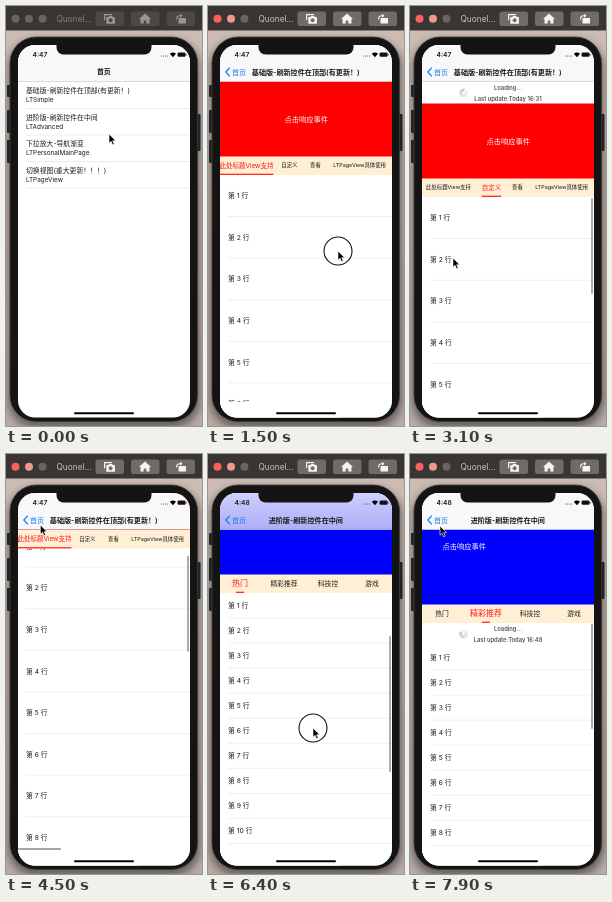
Write an HTML page that moves like this. It is 196 px wide and 420 px high and loops after 8 s.

```html
<!DOCTYPE html>
<html lang="zh">
<head>
<meta charset="utf-8">
<title>Scroll demo</title>
<style>
html, body { margin: 0; width: 100%; height: 100%; overflow: hidden; background: #b5a8a3; }
svg { display: block; width: 100%; height: 100%; }
text { font-family: Inter, "Noto Sans CJK SC", "Noto Sans CJK", sans-serif; white-space: pre; }
</style>
</head>
<body>
<svg id="stage" viewBox="0 0 196 420">
  <defs>
    <clipPath id="screenClip"><rect x="12" y="39" width="172" height="372.5" rx="17"/></clipPath>
    <linearGradient id="wall" x2="0" y2="1"><stop stop-color="#cdbdb4"/><stop offset="1" stop-color="#b9aca5"/></linearGradient>
    <linearGradient id="tint" x2="0" y2="1"><stop stop-color="#cfcfff"/><stop offset="1" stop-color="#aeaef6"/></linearGradient>
    <filter id="soft"><feGaussianBlur stdDeviation="4"/></filter>
  </defs>
</svg>
<script>
const LOOP = 8000, STEP = 100, TRAVEL = 370;
const LEFT = 12, WIDTH = 172, RIGHT = LEFT + WIDTH;
const TOP = 76, LIST_END = 395.8, HEADER = 74.5, BAR = 18.5, PULL = 22, OVERPULL = 40;
const BLUE = '#0f7bf5', RED = '#ff1a12';
const stage = document.getElementById('stage');

function el(parent, tag, attrs = {}, content) {
  const node = document.createElementNS('http://www.w3.org/2000/svg', tag);
  set(node, attrs);
  if (content !== undefined) node.textContent = content;
  return parent.appendChild(node);
}
function set(node, attrs) {
  for (const key in attrs) node.setAttribute(key, attrs[key]);
}
const show = (node, visible) => set(node, { display: visible ? 'inline' : 'none' });
const move = (node, x, y) => set(node, { transform: `translate(${x} ${y})` });
const group = parent => el(parent, 'g');
const rect = (parent, x, y, width, height, fill, rx = 0) =>
  el(parent, 'rect', { x, y, width, height, fill, rx });
const rule = (parent, x, y, stroke) =>
  el(parent, 'path', { d: `M${x} ${y}H${RIGHT}`, stroke, 'stroke-width': .5 });
// y is the visual middle of the line of text
const label = (parent, x, y, size, content, attrs = {}) =>
  el(parent, 'text', { x, y: y + size * .36, 'font-size': size, fill: '#1a1a1a', ...attrs }, content);

const clamp = v => Math.max(0, Math.min(1, v));
const mix = (a, b, p) => a + (b - a) * p;
const ramp = (t, start, length) => {
  const p = clamp((t - start) / length);
  return p * p * (3 - 2 * p);
};
const fade = (t, a, b) => clamp((t - a) / 100) * clamp((b - t) / 200);

// Pointer gestures: everything on screen follows from these
const drag = (start, length, x, y, dx, dy) => ({ start, length, x, y, dx, dy, end: start + length });
const tap = (start, x, y) => drag(start, 100, x, y, 0, 0);
const hide = (start, x, y) => drag(start, 230, x, y, 0, -HEADER);
const reveal = (start, x, y) => drag(start, 230, x, y, 0, HEADER);
const swipe = (start, x, y, dx) => drag(start, 250, x, y, dx, 0);
const pull = (start, x, y) => drag(start, 400, x, y, 0, OVERPULL);
const progress = (g, t) => ramp(t, g.start, g.length);

const simple = {
  open: tap(250, 75, 88), hide: hide(700, 98.5, 264), reveal: reveal(1200, 98.5, 190),
  next: swipe(1500, 130, 245, -70), pull: pull(2100, 85.5, 240), loaded: 3250,
  prev: swipe(3500, 43, 252, 90), hideAgain: hide(3950, 118, 240), close: tap(4600, 30, 66)
};
const advanced = {
  open: tap(5250, 75, 115), hide: hide(6300, 105, 304), reveal: reveal(6620, 105, 230),
  next: swipe(6880, 130, 280, -70), pull: pull(7130, 80, 255), loaded: LOOP, close: tap(7950, 30, 72)
};
const gestures = [simple, advanced].flatMap(tour => Object.values(tour).filter(g => g.start));

function pointerAt(t) {
  let x = 103, y = 128, freeAt = 0;
  for (const g of gestures) {
    const arrive = ramp(t, freeAt, Math.min(TRAVEL, g.start - freeAt)), p = progress(g, t);
    x = mix(x, g.x, arrive) + g.dx * p;
    y = mix(y, g.y, arrive) + g.dy * p;
    if (t < g.end) break;
    freeAt = g.end;
  }
  return [x, y];
}

function tourState(tour, t) {
  const { open, hide, reveal, next, pull, prev, hideAgain, close, loaded } = tour;
  const done = g => g ? progress(g, t) : 0;
  const settle = g => g ? ramp(t, g.start + 50, 300) : 0;
  const released = ramp(t, pull.end + 20, 120);
  return {
    time: t,
    slide: settle(open) - settle(close),
    offset: HEADER * (done(reveal) - done(hide) - done(hideAgain)),
    scroll: hideAgain ? 23 * ramp(t, hideAgain.start, 400) : 0,
    pull: OVERPULL * done(pull) - (OVERPULL - PULL) * released - PULL * ramp(t, loaded, 200),
    loading: t >= pull.end && t < loaded + 200,
    tab: settle(next) - settle(prev),
    mainBar: fade(t, hide.start - 100, reveal.end + 200),
    listBar: Math.max(fade(t, pull.start, pull.end + 900), hideAgain ? fade(t, hideAgain.start, close.end + 200) : 0),
    pageBar: Math.max(fade(t, next.start, next.end + 350), prev ? fade(t, prev.start, close.end) : 0)
  };
}

// Desktop, window bar and phone body
rect(stage, 0, 0, 196, 420, 'url(#wall)');
set(rect(stage, 2, 34, 192, 388, '#000', 28), { filter: 'url(#soft)', opacity: .45 });
rect(stage, 0, 0, 196, 24.5, '#3a3535');
const lights = ['#fa6159', '#f0998a', '#696464'].map((color, i) =>
  ({ color, node: el(stage, 'circle', { cx: 9.5 + 13.5 * i, cy: 12.7, r: 4 }) }));
const windowTitle = label(stage, 50.5, 13, 8.3, 'Quonel...');
const buttons = [0, 1, 2].map(i => rect(stage, 89.5 + 35.5 * i, 5.5, 28.5, 14.5, '#666', 2.5));
const icons = group(stage);
el(icons, 'path', { d: 'M98 8h8v1.2h-6.8v5H98z' });
el(icons, 'path', { d: 'M100.3 11h2l.8-1h3l.8 1h2v6.8h-8.6zM104.6 12.3a2 2 0 1 0 .01 0z', 'fill-rule': 'evenodd' });
el(icons, 'path', { d: 'M139 7.5l6 5.4h-1.5v4.6h-3.2v-3h-2.6v3h-3.2v-4.6H133z' });
el(icons, 'path', { d: 'M172.5 12h7.5v5.5h-7.5zM170 13.5q-.3-4.3 4-4.3V7.7l2.6 2.1-2.6 2v-1.5q-3-.1-2.8 3.2z' });

rect(stage, 1, 79, 4, 12, '#222', 1);
rect(stage, 1, 104, 4, 23, '#222', 1);
rect(stage, 1, 134, 4, 23, '#222', 1);
rect(stage, 191, 108, 3.5, 37, '#222', 1);
set(rect(stage, 4, 31, 187.5, 384.5, '#141415', 26), { stroke: '#3d3d40', 'stroke-width': .8 });
const screen = el(stage, 'g', { 'clip-path': 'url(#screenClip)' });
const blank = parent => rect(parent, LEFT, 38, WIDTH, 374, '#fff');

// Home list
const TITLES = ['基础版-刷新控件在顶部(有更新！)', '进阶版-刷新控件在中间', '下拉放大-导航渐变', '切换视图(重大更新！！！)'];
const NAMES = ['LTSimple', 'LTAdvanced', 'LTPersonalMainPage', 'LTPageView'];
const home = group(screen);
blank(home);
const cells = TITLES.map((title, i) => {
  const y = TOP + 26.5 * i;
  const highlight = rect(home, LEFT, y, WIDTH, 26.5, '#d9d9d9');
  label(home, 20, y + 8.7, 6.85, title);
  label(home, 20, y + 17.9, 6.4, NAMES[i]);
  rule(home, 20, y + 26.5, '#d9d9d9');
  return highlight;
});

function makePage({ color, rowHeight, tabs, tabSize, activeSize, pitch, textAt, stamp, inner }) {
  const root = group(screen);
  blank(root);
  const lists = group(root);
  const rows = [0, 1].map(() => {
    const g = group(lists);
    for (let i = 0; i < 25; i++) {
      label(g, 20, rowHeight * (i + .5), 6.8, `第 ${i + 1} 行`);
      rule(g, 20, rowHeight * (i + 1), '#dedede');
    }
    return g;
  });
  rect(root, LEFT, LIST_END, WIDTH, 20, '#fff');

  const refresh = group(root);
  const bold = { 'font-weight': 600, 'text-anchor': 'middle', fill: '#555' };
  const status = label(refresh, 98, 5.5, 5.8, '', bold);
  label(refresh, 98, 16.5, 5.8, 'Last update:Today ' + stamp, bold);
  const arrow = el(refresh, 'path', { d: 'M53.5 6v10m-3-3l3 3 3-3', fill: 'none', stroke: '#777' });
  const spinner = group(refresh);
  for (let i = 0; i < 12; i++) {
    el(spinner, 'path', {
      d: 'M0-2v-2.2', stroke: '#777', 'stroke-width': .8, 'stroke-linecap': 'round',
      opacity: .15 + i * .05, transform: `rotate(${i * 30})`
    });
  }

  const header = group(root);
  rect(header, LEFT, -.5, WIDTH, HEADER + 1, color);
  label(header, ...textAt, 7.25, '点击响应事件', { fill: '#fff' });

  // Tabs stand at an even pitch, or follow each other with a fixed gap
  const bar = group(root);
  rect(bar, LEFT, 0, WIDTH, BAR, '#ffefd5');
  let nextX = 16;
  const titles = tabs.map((text, i) => {
    const node = label(bar, 0, 9, tabSize, text, { 'text-anchor': 'middle' });
    const width = node.getComputedTextLength();
    const x = pitch ? 32 + pitch * i : nextX + width / 2;
    nextX += width + 12.5;
    set(node, { x });
    return { node, x, mark: pitch ? 8 : width * activeSize / tabSize };
  });
  const mark = rect(bar, 0, BAR - 1.3, 10, 1.2, RED);
  const scroller = (width, height) => rect(root, 181.3, LIST_END - 1.5, width, height, '#8a8a8a', .7);
  const mainBar = scroller(1.4, 136), listBar = scroller(1.4, inner ? 105 : 96), pageBar = scroller(43, 1.4);

  return s => {
    show(root, s.slide > 0);
    move(root, (1 - s.slide) * WIDTH, 0);
    const headY = TOP + s.offset + (inner ? 0 : s.pull);
    const barY = Math.max(TOP, headY + HEADER);
    const listY = barY + BAR + (inner ? s.pull : 0);
    move(header, 0, headY);
    move(bar, 0, barY);
    move(lists, -s.tab * WIDTH, 0);
    rows.forEach((g, i) => move(g, i * WIDTH, listY - (i ? 0 : s.scroll)));

    show(refresh, s.pull > .2);
    move(refresh, 0, (inner ? listY : headY) - PULL);
    const ready = s.pull > PULL;
    status.textContent = s.loading ? 'Loading...' : ready ? 'Release to refresh' : 'Pull down to refresh';
    show(arrow, !s.loading);
    set(arrow, { transform: `rotate(${ready ? 180 : 0} 53.5 11)` });
    show(spinner, s.loading);
    set(spinner, { transform: `translate(53.5 11) rotate(${s.time * .36})` });

    titles.forEach(({ node }, i) => {
      const on = clamp(1 - Math.abs(s.tab - i)), size = mix(tabSize, activeSize, on);
      set(node, { 'font-size': size, y: 9 + size * .36, fill: `rgb(${mix(26, 255, on)},26,22)` });
    });
    const width = mix(titles[0].mark, titles[1].mark, s.tab);
    set(mark, { x: mix(titles[0].x, titles[1].x, s.tab) - width / 2, width });
    set(mainBar, { y: 152 - s.offset, opacity: inner ? s.mainBar : 0 });
    set(listBar, { y: barY + BAR + 1 + s.scroll * .27, opacity: s.listBar });
    set(pageBar, { x: LEFT + s.tab * WIDTH / 4, opacity: s.pageBar });
  };
}

const drawSimple = makePage({
  color: '#ff0000', rowHeight: 41.6, tabSize: 5.4, activeSize: 6.5, textAt: [76.5, 37], stamp: '16:31',
  tabs: ['此处标题View支持', '自定义', '查看', 'LTPageView具体使用']
});
const drawAdvanced = makePage({
  color: '#0000ff', rowHeight: 25.05, tabSize: 6.8, activeSize: 8, pitch: 44, textAt: [32.5, 16], stamp: '16:48',
  tabs: ['热门', '精彩推荐', '科技控', '游戏'], inner: true
});

// Navigation and status bars
rect(screen, LEFT, 38, WIDTH, 37.5, '#f8f8fa');
const tint = rect(screen, LEFT, 38, WIDTH, 37.5, 'url(#tint)');
rule(screen, LEFT, 75.5, '#b8b8bc');
const navTitle = (text, size) => label(screen, 97.8, 66, size, text, { 'font-weight': 600, 'text-anchor': 'middle' });
const homeTitle = navTitle('首页', 6.9);
const pageTitles = TITLES.slice(0, 2).map(text => navTitle(text, 7.1));
const back = group(screen);
el(back, 'path', { d: 'M21.8 61.6l-4 4.4 4 4.4', fill: 'none', stroke: BLUE, 'stroke-width': 1.2 });
label(back, 24, 66, 7, '首页', { fill: BLUE });
const clock = label(screen, 26.5, 48.8, 6.7, '', { 'font-weight': 600 });
for (let i = 0; i < 4; i++) rect(screen, 155 + i * 2, 49.4, 1.2, 1.2, '#555', .5);
el(screen, 'path', { d: 'M163.8 47.8q3.1-2.8 6.2 0l-3.1 3.4z' });
rect(screen, 171.6, 46.6, 8, 4.2, '#111', 1.2);
rect(screen, 180, 48, .6, 1.4, '#111');
rect(screen, 50.5, 30, 95, 18.5, '#141415', 7);
rect(screen, 68, 406.2, 60, 2, '#000', 1);

const pointer = group(stage);
const touch = el(pointer, 'circle', { r: 14, fill: '#fff', 'fill-opacity': .6, stroke: '#111', 'stroke-width': 1.1 });
el(pointer, 'path', {
  d: 'M0 0v9.2l2.1-1.9 1.5 3.5 1.6-.7-1.5-3.4h2.9z', fill: '#000', stroke: '#fff', 'stroke-width': .6
});

function render(t) {
  const states = [tourState(simple, t), tourState(advanced, t)];
  const slide = Math.max(...states.map(s => s.slide));
  drawSimple(states[0]);
  drawAdvanced(states[1]);

  move(home, -slide * WIDTH * .3, 0);
  cells.forEach((node, i) => {
    const tour = [simple, advanced][i];
    show(node, tour && t >= tour.open.start && t < tour.open.start + 350);
  });
  set(tint, { opacity: states[1].slide * clamp(-states[1].offset / 30) });
  set(homeTitle, { opacity: 1 - slide, transform: `translate(${-slide * 60} 0)` });
  pageTitles.forEach((node, i) => {
    set(node, { opacity: states[i].slide, transform: `translate(${(1 - states[i].slide) * 80} 0)` });
  });
  set(back, { opacity: slide });
  clock.textContent = t < advanced.open.start ? '4:47' : '4:48';

  const active = t >= 200;
  lights.forEach(({ node, color }) => set(node, { fill: active ? color : '#696464' }));
  set(windowTitle, { fill: active ? '#c5c2c2' : '#858080' });
  buttons.forEach(node => set(node, { fill: active ? '#706b6b' : '#4d4848' }));
  set(icons, { fill: active ? '#f5f3f3' : '#9a9595' });

  move(pointer, ...pointerAt(t));
  show(touch, gestures.some(g => t >= g.start && t < g.end));
}

const start = performance.now();
function tick() {
  const elapsed = (performance.now() - start) % LOOP;
  render(Math.floor(elapsed / STEP) * STEP);
  requestAnimationFrame(tick);
}
tick();
</script>
</body>
</html>
```
